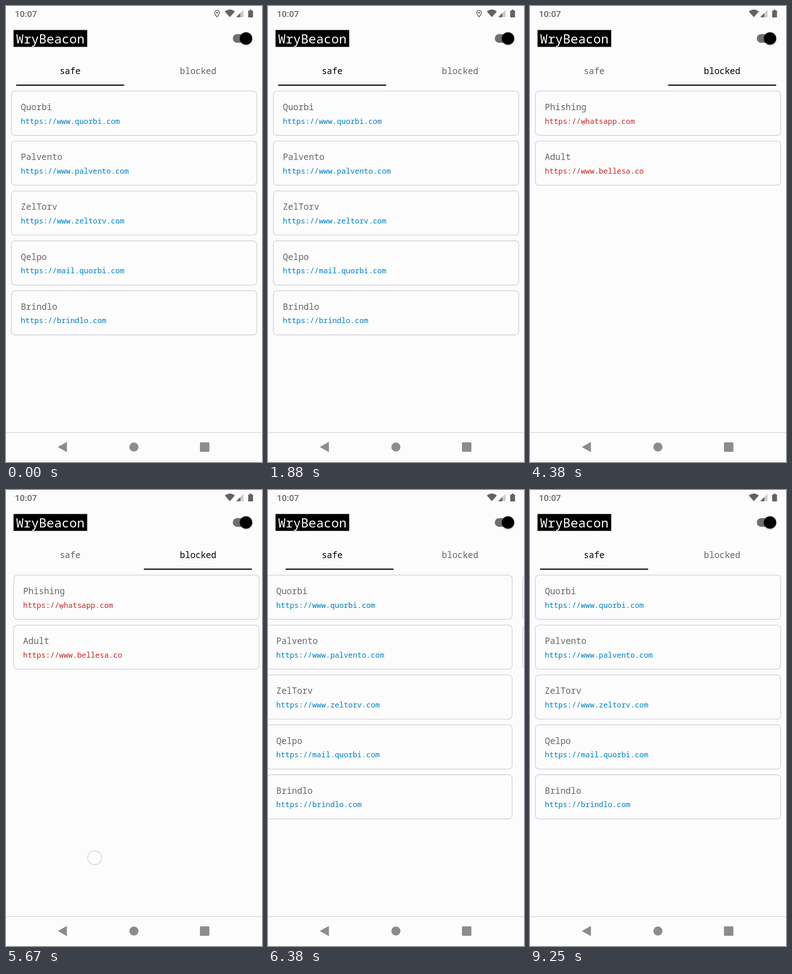
Animation of 561 by 998 pixels, one loop 9.42 s. Source, as an HTML page:

```html
<!DOCTYPE html>
<html lang="en">
<head>
<meta charset="utf-8">
<title>Link checker</title>
<style>
  html, body { margin: 0; width: 100%; height: 100%; overflow: hidden; background: #fcfcfd; }
  svg { display: block; width: 100vw; height: 100vh; font-family: "Noto Sans Mono", "DejaVu Sans Mono", monospace; }
  .card { fill: none; stroke: #d2d2da; stroke-width: 1.6; }
  .label, .tab { font-size: 19px; font-weight: 500; fill: #666; }
  .tab { text-anchor: middle; }
  .tab.on { fill: #000; }
  .url { font-size: 16.45px; }
  .icon { fill: #626262; }
  .nav { fill: #8c8c8c; }
</style>
</head>
<body>
<svg viewBox="0 0 561 998">
  <defs>
    <filter id="shadow" x="-30%" y="-30%" width="160%" height="170%">
      <feDropShadow dx="0" dy="1.5" stdDeviation="1.5" flood-opacity=".35"/>
    </filter>
  </defs>

  <text x="19.5" y="24" font-family="Roboto, sans-serif" font-size="19" font-weight="500" fill="#666">10:07</text>
  <g class="icon">
    <path id="pin" fill-rule="evenodd" d="M462.5 8.5a6 6 0 0 0-6 6c0 4.2 6 10.700 6 10.700s6-6.500 6-10.700a6 6 0 0 0-6-6zm0 1.700a4.300 4.300 0 0 1 4.300 4.300c0 2.400-2.700 6-4.300 8-1.600-2-4.300-5.600-4.300-8a4.300 4.300 0 0 1 4.300-4.300zm0 2.200a2.100 2.100 0 1 0 0 4.200 2.100 2.100 0 0 0 0-4.200z"/>
    <path d="M479.500 12Q490.500 3.500 501.500 12L490.500 24.500z"/>
    <path d="M504.500 24.500 520.500 8.500V24.500z" fill="#cbcbcb"/>
    <path d="M504.500 24.500 513.500 15.500V24.500z"/>
    <path d="M534 8h4v2h2q1.300 0 1.300 1.300v12.400q0 1.300-1.300 1.300h-8q-1.300 0-1.300-1.300v-12.400q0-1.300 1.300-1.300h2z"/>
  </g>

  <rect x="16.500" y="52.500" width="161.500" height="37" fill="#000"/>
  <text x="22" y="82" font-size="27.800" fill="#fff">WryBeacon</text>
  <rect x="497" y="61.500" width="40" height="19" rx="9.500" fill="#70706a"/>
  <circle cx="526" cy="71" r="13.600" filter="url(#shadow)"/>

  <text id="safeTab" class="tab" x="140.500" y="149">safe</text>
  <text id="blockedTab" class="tab" x="421" y="149">blocked</text>
  <rect id="bar" x="22" y="172" width="237" height="2.600" rx="1.300"/>
  <g id="pages"></g>

  <path d="M0 933.500H561" stroke="#d4d4d8" stroke-width="1.600"/>
  <g class="nav">
    <path d="M113.500 965.200 133.500 954V976.500z"/>
    <circle cx="280.300" cy="965.200" r="10"/>
    <rect x="425" y="955" width="20.700" height="20.700" rx="2"/>
  </g>
  <circle id="touch" cy="805" r="15.200" fill="#fefefe" fill-opacity=".6" stroke="#d6d8ea" stroke-width="2"/>
</svg>

<script>
const LOOP = 9420, WIDTH = 561, TAB_STEP = 280.5, LAG = 40;
const $ = id => document.getElementById(id);

const safe = [
  ["Quorbi", "https://www.quorbi.com"],
  ["Palvento", "https://www.palvento.com"],
  ["ZelTorv", "https://www.zeltorv.com"],
  ["Qelpo", "https://mail.quorbi.com"],
  ["Brindlo", "https://brindlo.com"]
];
const blocked = [
  ["Phishing", "https://ẉhatsapp.com"],
  ["Adult", "https://www.bellesa.co"]
];

const cards = (list, left, color) => list.map(([label, url], i) =>
  `<g transform="translate(${left} ${i * 109.2})">
    <rect class="card" x="11.800" y="186.300" width="537.700" height="96.800" rx="8"/>
    <text class="label" x="32.500" y="228">${label}</text>
    <text class="url" x="32.500" y="257.500" fill="${color}">${url}</text>
  </g>`).join("");
$("pages").innerHTML = cards(safe, 0, "#0080c0") + cards(blocked, WIDTH, "#c62828");

// Each swipe: accelerating drag, then a fling that eases to rest.
const swipes = [
  { start: 3160, release: 3650, end: 4020, finger: 400, dir: -1 },
  { start: 5600, release: 6090, end: 6460, finger: 189, dir: 1 }
];
const DRAG = 244 / WIDTH;
const clamp = v => Math.min(1, Math.max(0, v));

function progress(s, t) {
  if (t <= s.release) return DRAG * clamp((t - s.start) / (s.release - s.start)) ** 2;
  const rest = 1 - clamp((t - s.release) / (s.end - s.release));
  return 1 - (1 - DRAG) * rest * rest;
}

const pageAt = t => progress(swipes[0], t) - progress(swipes[1], t);

function draw(t) {
  const page = pageAt(t);
  $("pages").setAttribute("transform", `translate(${-page * WIDTH} 0)`);
  $("bar").setAttribute("x", 22 + pageAt(t - LAG) * TAB_STEP);
  $("safeTab").classList.toggle("on", page < 0.5);
  $("blockedTab").classList.toggle("on", page >= 0.5);
  $("pin").style.display = t < 3000 ? "" : "none";

  const active = swipes.find(s => t >= s.start - 40 && t < s.release + 40);
  $("touch").style.display = active ? "" : "none";
  if (active) $("touch").setAttribute("cx", active.finger + active.dir * progress(active, t) * WIDTH);
}

const begin = performance.now();
function tick() {
  draw((performance.now() - begin) % LOOP);
  requestAnimationFrame(tick);
}
tick();
</script>
</body>
</html>
```
